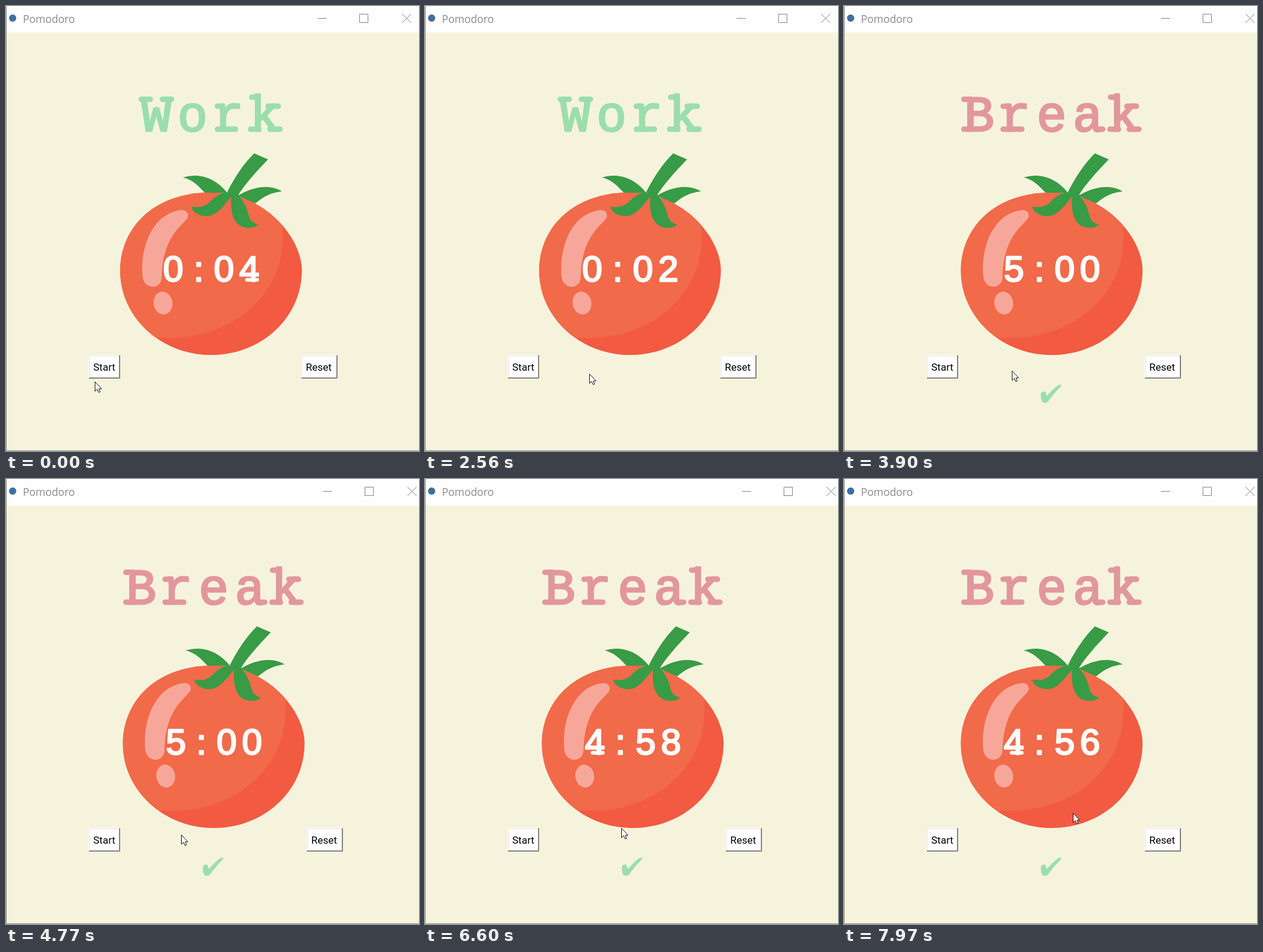
Recreate the animation shown at these times as an HTML page. Size 684 by 737 pixels, loop 8 s.

```html
<!DOCTYPE html>
<html lang="en">
<head>
<meta charset="utf-8">
<title>Pomodoro</title>
<style>
  html, body { margin: 0; width: 100%; height: 100%; overflow: hidden; background: #f6f3dd; }
  svg { display: block; }
  .title { font: 17.4px "Open Sans", sans-serif; fill: #8c8c8c; }
  .label { font: 17px Roboto, sans-serif; }
  .head { font: 83px "Liberation Mono", monospace; letter-spacing: 10.2px; stroke-width: 3; stroke-linejoin: round; }
  .slab { fill: none; stroke-width: 9; stroke-linecap: round; }
  .time { font: 60px "Liberation Sans", sans-serif; fill: #fff; stroke: #fff; stroke-width: 2.6; stroke-linejoin: round; text-anchor: middle; }
  .work { fill: #9bdeac; stroke: #9bdeac; }
  .rest { fill: #e2979c; stroke: #e2979c; }
</style>
</head>
<body>
<svg width="684" height="737" viewBox="0 0 684 737">
  <defs>
    <path id="body" d="M339 309C430 309 490 385 490 438C490 515 424 578 340 578C256 578 189 515 189 438C189 372 240 309 339 309Z"/>
    <clipPath id="skin"><use href="#body"/></clipPath>
  </defs>

  <rect width="684" height="737" fill="#f6f3dd"/>
  <rect width="684" height="44" fill="#fefefe"/>
  <path d="M.5 0V736.5H684" fill="none" stroke="#8c8a80"/>
  <circle cx="11" cy="20" r="6" fill="#3f6f9f"/>
  <text x="28" y="28" class="title">Pomodoro</text>
  <path id="controls" fill="none" stroke="#858585" d="M516 20.5h15M585.5 13.5h14v14h-14zM656 13l15 15m0-15l-15 15"/>

  <g id="stage">
    <g id="work" class="work">
      <text class="head" x="224" y="206.500">Work</text>
      <path class="slab" d="M224 154.500h15M259 154.500h15M350 166h9M350 204h30M407 151h9M405 204h14M437 204h17M434 166h17"/>
    </g>
    <g id="rest" class="rest">
      <text class="head" x="194.500" y="206.500">Break</text>
      <path class="slab" d="M194 154.500h12M194 204h12M259 166h10M259 204h31M416 204h8M437 151h9M436 204h14M468 204h16M464 166h16"/>
    </g>
    <use href="#body" fill="#f25a41"/>
    <path clip-path="url(#skin)" fill="#f16a4a" d="M457 357C465 425 440 478 388 515C350 541 300 553 258 549L180 560V300H457Z"/>
    <g fill="#f7a79a">
      <path d="M290 338C298 337 303 343 301 350C296 362 259 378 258 450C257 460 250 465 243 465C235 465 227 459 226 447C222 395 245 343 290 338Z"/>
      <ellipse cx="260" cy="492" rx="15.500" ry="19" transform="rotate(-10 260 492)"/>
    </g>
    <g fill="#389b45">
      <path d="M411 244L434 254C412 277 395 296 384 314L366 309C378 285 392 263 411 244Z"/>
      <path d="M293 284C318 276 346 283 367 310L329 309C319 298 308 287 293 284Z"/>
      <path d="M384 314C405 301 435 293 457 307C440 309 428 314 413 327L390 317Z"/>
      <path d="M307 332C320 335 331 331 337 325C345 316 356 309 366 309L374 315C360 330 350 349 330 348C318 347 309 341 307 332Z"/>
      <path d="M366 309L373 316C372 335 374 352 384 361C393 369 409 370 418 362C403 358 403 350 400 340C397 329 391 322 386 313Z"/>
    </g>
    <text id="time" class="time" x="277 319 361 403" y="456"></text>
    <path id="foot" d="M0 453.500h17" stroke="#fff" stroke-width="6" stroke-linecap="round"/>
  </g>

  <path id="check" fill="#9bdeac" d="M326 643C326 639 333 637 334 640L336 646C342 639 350 631 355 628C357 627 361 627 360 629C354 635 345 645 339 654C336 658 330 658 328 655C326 651 326 647 326 643Z"/>
  <g id="start"></g>
  <g id="reset"></g>
  <path id="cursor" fill="#fff" stroke="#111" d="M.5.500V16L4 12.700L6.500 18L9 17L6.700 12H11.300Z"/>
</svg>
<script>
  const LOOP = 8000, TICK = 1003, PHASE = 116;
  const WORK_LEFT = 4, BREAK_LENGTH = 300;
  const $ = id => document.getElementById(id);
  const place = (id, x, y = 0) => $(id).setAttribute('transform', `translate(${x} ${y})`);
  const show = (id, on) => $(id).setAttribute('visibility', on ? 'visible' : 'hidden');

  function button(id, text, w, h = 39) {
    const edge = (d, color) => `<path fill="none" stroke="${color}" d="${d}"/>`;
    $(id).innerHTML = `<rect width="${w}" height="${h}" fill="#fff"/>`
      + edge(`M1.5 ${h - 2}V1.5H${w - 2}`, '#e3e3e3')
      + edge(`M1 ${h - 1.5}H${w - 1.5}V1`, '#a0a0a0')
      + edge(`M0 ${h - .5}H${w - .5}V0`, '#696969')
      + `<text x="7.5" y="26" class="label">${text}</text>`;
  }

  // pointer glides: begin, end, target x, target y
  const home = [147, 622];
  const glides = [
    [30, 60, 146, 624], [2150, 2670, 288, 604], [3470, 3560, 278, 604],
    [4520, 4960, 298, 578], [5500, 5930, 291, 592], [6170, 6600, 325, 578],
    [6730, 7230, 348, 570], [7470, 7970, 379, 553]
  ];

  // each glide eases in and out; long ones sag a little
  function pointer(t) {
    let [x, y] = home;
    for (const [begin, end, toX, toY] of glides) {
      const s = Math.min(1, Math.max(0, (t - begin) / (end - begin)));
      const k = s * s * (3 - 2 * s);
      const sag = Math.abs(toX - x) / 18 * Math.sin(Math.PI * k);
      x += (toX - x) * k;
      y += (toY - y) * k + sag;
    }
    return [Math.round(x), Math.round(y)];
  }

  function draw(t) {
    const left = WORK_LEFT - Math.floor((t + PHASE) / TICK);
    const rest = left <= 0;
    const sec = rest ? BREAK_LENGTH + left : left;
    const label = `${Math.floor(sec / 60)}:${String(sec % 60).padStart(2, '0')}`;
    const four = label.indexOf('4');
    if ($('time').textContent !== label) $('time').textContent = label;
    show('foot', four >= 0);
    place('foot', 273 + 42 * four);
    show('work', !rest);
    show('rest', rest);
    show('check', rest);

    // the wider heading widens the window and recentres the column
    const grow = rest ? 9 : 0;
    place('stage', grow / 2);
    place('controls', grow);
    place('reset', 489 + grow, 578);
    place('cursor', ...pointer(t));
  }

  button('start', 'Start', 52);
  button('reset', 'Reset', 60);
  place('start', 137, 578);

  const t0 = performance.now();
  function frame() {
    draw((performance.now() - t0) % LOOP);
    requestAnimationFrame(frame);
  }
  frame();
</script>
</body>
</html>
```
